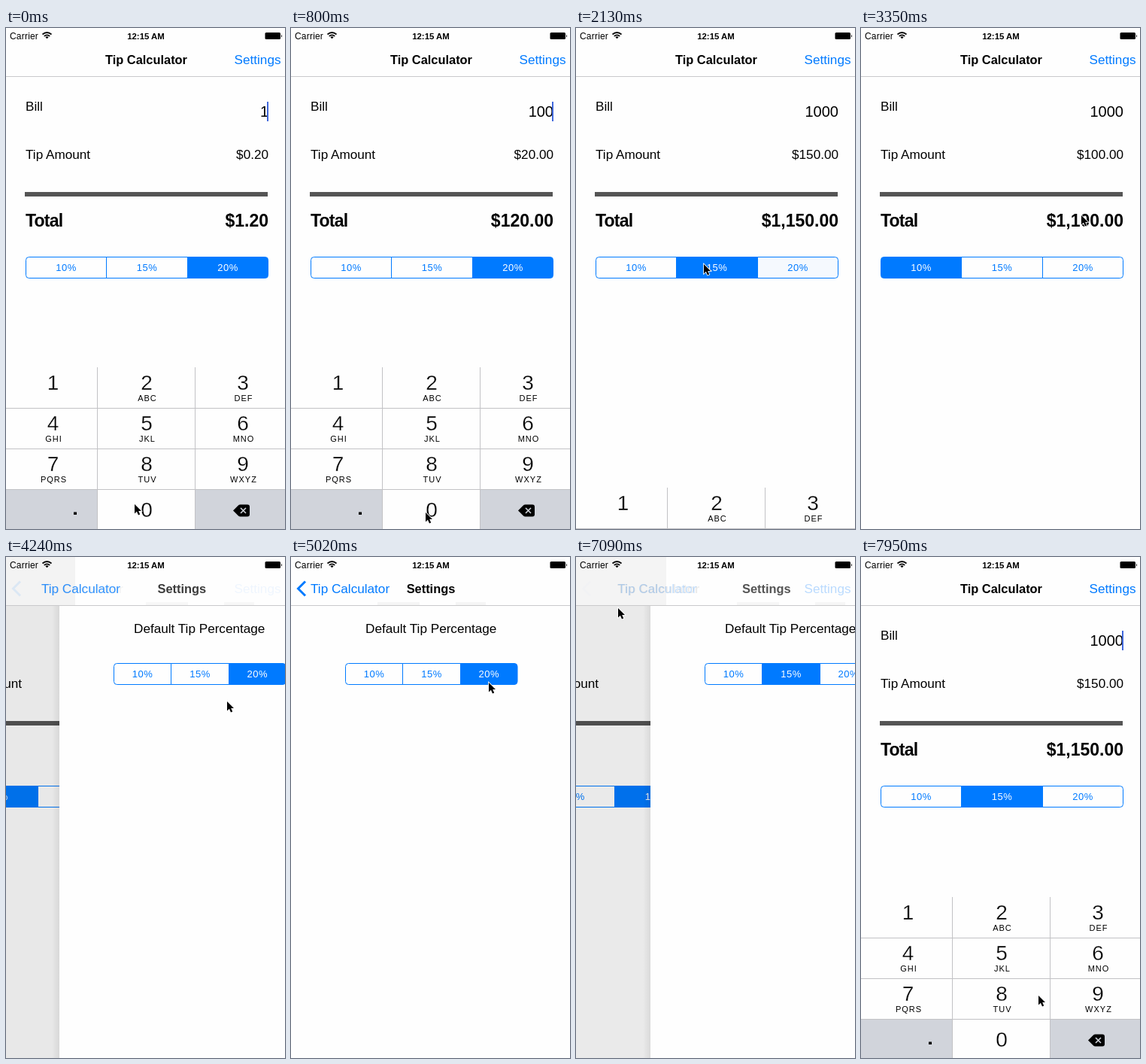
Animation of 371 by 666 pixels, one loop 8000 ms. Source, as an HTML page:

```html
<!DOCTYPE html>
<html lang="en">
<head>
<meta charset="utf-8">
<title>Tip Calculator</title>
<style>
  html, body { margin: 0; width: 100%; height: 100%; overflow: hidden; background: #fefefe; }
  svg { display: block; font-family: "Liberation Sans", Arial, sans-serif; font-size: 17.15px; }
  .bold { font-weight: bold; font-size: 16.4px; }
  .sum { font-weight: bold; font-size: 23px; }
  .blue { fill: #007aff; }
  .end { text-anchor: end; }
  .mid { text-anchor: middle; }
  .seg { font-size: 13px; letter-spacing: .5px; text-anchor: middle; }
  .digit { font-size: 28px; text-anchor: middle; stroke: #fefefe; stroke-width: .35px; }
  .abc { font-size: 11px; letter-spacing: 1px; text-anchor: middle; }
</style>
</head>
<body>
<svg id="stage" width="371" height="666" viewBox="0 0 371 666">
  <defs>
    <linearGradient id="edge"><stop offset="0" stop-opacity="0"/><stop offset="1" stop-opacity=".07"/></linearGradient>
  </defs>
  <rect width="371" height="666" fill="#fefefe"/>

  <g id="calc">
    <text x="26" y="110">Bill</text>
    <text id="bill" class="end" x="349" y="118" font-size="20"></text>
    <rect id="caret" x="347" y="98" width="2" height="26" fill="#4068dc"/>
    <text x="26" y="174">Tip Amount</text>
    <text id="tip" class="end" x="349" y="174"></text>
    <rect x="25" y="218" width="323" height="6" fill="#555"/>
    <text class="sum" x="26" y="264" letter-spacing="-.8">Total</text>
    <text id="total" class="sum end" x="349" y="264"></text>
    <g id="tipSeg"></g>
  </g>
  <rect id="dim" width="371" height="666"/>
  <g id="pad"></g>

  <g id="page">
    <rect x="-10" width="10" height="666" fill="url(#edge)"/>
    <rect width="371" height="666" fill="#fefefe"/>
    <text x="99" y="101">Default Tip Percentage</text>
    <g id="defSeg"></g>
  </g>

  <rect width="371" height="64" fill="#fefefe"/>
  <rect id="shade" height="64"/>
  <path id="smudge" d="M115 60h56v4h-56zM219 60h40v4h-40z" fill="#f5f5f5"/>
  <path d="M0 64.5H371" stroke="#c9c9cb"/>
  <text class="bold mid" id="title" x="186.5" y="48">Tip Calculator</text>
  <text class="blue end" id="link" x="365.5" y="48">Settings</text>
  <path id="arrow" d="M19 32.5L9.5 42L19 51.5" fill="none" stroke="#007aff" stroke-width="3"/>
  <text class="blue" id="back" x="26" y="48">Tip Calculator</text>
  <text class="bold mid" id="name" x="186" y="48">Settings</text>

  <text x="5" y="14.5" font-size="12" letter-spacing=".2">Carrier</text>
  <g fill="none" stroke="#000" stroke-width="1.7">
    <path d="M48.5 8.5Q54.5 3.5 60.5 8.5M50.7 10.9Q54.5 7.8 58.3 10.9"/>
    <path d="M52.3 12L54.5 14.3L56.7 12Q54.5 10.3 52.3 12Z" fill="#000" stroke="none"/>
  </g>
  <text class="mid" x="186" y="14.5" font-size="11.4" font-weight="bold">12:15 AM</text>
  <rect x="344.5" y="6" width="20.5" height="9" rx="1.5"/>
  <path d="M366 8.5q1.8 2 0 4z"/>

  <path id="mouse" d="M1 1V13.5L3.9 10.800L6 15.500L8.200 14.500L6.200 10H10Z" stroke="#fff" stroke-width="1.6" paint-order="stroke"/>
</svg>
<script>
const LOOP = 8000, W = 371;
const $ = id => document.getElementById(id);

// Runs of evenly spaced updates: first, last, count
const RUNS = [[0, 0, 1], [150, 800, 5], [1100, 2130, 8], [2270, 2600, 3], [2900, 3940, 8],
  [4090, 4240, 2], [4420, 5020, 4], [5170, 6210, 8], [6350, 6350, 1], [6650, 6650, 1], [6950, 7950, 7]];
const TICKS = RUNS.flatMap(([a, b, n]) =>
  Array.from({ length: n }, (_, i) => a + (n > 1 ? (b - a) * i / (n - 1) : 0)));

// Pointer path: time, x, y
const PATH = [[0, 170, 632], [320, 178, 643], [1250, 178, 643], [1840, 169, 313], [2200, 169, 313],
  [2600, 84, 322], [2900, 82, 323], [3050, 90, 320], [3350, 295, 247], [3600, 330, 42],
  [3970, 330, 42], [4240, 293, 191], [4420, 286, 190], [5020, 262, 166], [5620, 186, 163],
  [5910, 183, 162], [6060, 183, 162], [6210, 48, 45], [6350, 42, 35], [6900, 42, 35],
  [7600, 224, 480], [7950, 235, 582]];

const PUSH = 3997, POP = 6870, PAD_OUT = 1920, PAD_IN = 7360;

function add(parent, tag, attrs, text = "") {
  const el = document.createElementNS("http://www.w3.org/2000/svg", tag);
  for (const k in attrs) el.setAttribute(k, attrs[k]);
  el.textContent = text;
  parent.append(el);
  return el;
}

// Segmented control; returns a setter taking three fill levels
function segments(g, y, edges) {
  const [l, a, b, r] = edges, h = 28;
  const shapes = [
    `M${a} ${y}H${l + 4}q-4 0 -4 4v${h - 8}q0 4 4 4H${a}Z`,
    `M${a} ${y}H${b}v${h}H${a}Z`,
    `M${b} ${y}H${r - 4}q4 0 4 4v${h - 8}q0 4 -4 4H${b}Z`
  ];
  const cells = shapes.map((d, i) => [
    add(g, "path", { d, fill: "#007aff", stroke: "#007aff" }),
    add(g, "text", { class: "seg", x: (edges[i] + edges[i + 1]) / 2, y: y + 18.5 }, 10 + 5 * i + "%")
  ]);
  return levels => cells.forEach(([box, label], i) => {
    box.setAttribute("fill-opacity", levels[i]);
    label.setAttribute("fill", levels[i] > .5 ? "#fff" : "#007aff");
  });
}

function buildPad() {
  const g = $("pad"), cols = [0, 121.5, 251.5, W], mids = [62.5, 187, 315];
  const letters = ["", "ABC", "DEF", "GHI", "JKL", "MNO", "PQRS", "TUV", "WXYZ"];
  add(g, "rect", { y: 451, width: W, height: 215, fill: "#fefefe" });
  for (const c of [0, 2])
    add(g, "rect", { x: cols[c], y: 613, width: cols[c + 1] - cols[c], height: 53, fill: "#d1d4db" });
  const zero = add(g, "rect", { x: 122, y: 614, width: 129, height: 52 });
  add(g, "path", { d: "M0 505.5H371M0 559.5H371M0 613.5H371M121.5 451V666M251.5 451V666", stroke: "#c2c2c5" });
  letters.forEach((s, i) => {
    const x = mids[i % 3], y = 481 + 54 * Math.floor(i / 3);
    add(g, "text", { class: "digit", x, y }, i + 1);
    add(g, "text", { class: "abc", x: x + 1, y: y + 15 }, s);
  });
  add(g, "text", { class: "digit", x: 187, y: 650 }, "0");
  add(g, "rect", { x: 90, y: 643.5, width: 4, height: 3.5 });
  add(g, "path", { d: "M302 641.5L309 634.5Q310 633.5 311.5 633.5H321Q324 633.5 324 636.5V646.5Q324 649.5 321 649.5H311.5Q310 649.5 309 648.5Z" });
  add(g, "path", { d: "M312 638l7 7m0 -7l-7 7", stroke: "#d1d4db", "stroke-width": 1.6 });
  return zero;
}

const zeroKey = buildPad();
const setTip = segments($("tipSeg"), 304.5, [26.5, 133.5, 241.5, 348.5]);
const setDefault = segments($("defSeg"), 141.5, [72.5, 148.5, 225.5, 301]);

const clamp = v => Math.max(0, Math.min(1, v));
const spring = ms => {
  if (ms <= 0) return 0;
  const u = ms * .0126;
  return u > 9 ? 1 : 1 - (1 + u) * Math.exp(-u);
};
const within = (t, a, b) => t >= a && t < b;
const move = (id, x, y = 0) => $(id).setAttribute("transform", `translate(${x} ${y})`);
const fade = (id, v) => $(id).setAttribute("opacity", v);
const money = v => "$" + v.toLocaleString("en-US", { minimumFractionDigits: 2, maximumFractionDigits: 2 });

// Fill levels from a list of [time, index] choices; the old choice fades out
function levels(t, picks) {
  const out = [0, 0, 0];
  const k = picks.findLastIndex(p => p[0] <= t);
  if (k > 0) out[picks[k - 1][1]] = clamp(1 - (t - picks[k][0]) / 218);
  out[picks[k][1]] = 1;
  return out;
}

function pointer(t) {
  const i = PATH.findIndex(p => p[0] > t);
  if (i < 0) return PATH.at(-1).slice(1);
  const [a, b] = [PATH[i - 1], PATH[i]];
  const u = (t - a[0]) / (b[0] - a[0]);
  return [a[1] + (b[1] - a[1]) * u, a[2] + (b[2] - a[2]) * u];
}

function draw(t) {
  const bill = t < 300 ? 1 : t < 620 ? 10 : t < 1240 ? 100 : 1000;
  const rate = t < PAD_OUT ? 20 : t < 2850 ? 15 : t < POP ? 10 : 15;
  const tip = bill * rate / 100;
  $("bill").textContent = bill;
  $("tip").textContent = money(tip);
  $("total").textContent = money(bill + tip);
  fade("caret", t < PAD_OUT || t >= PAD_IN ? 1 : 0);
  setTip(t < POP ? levels(t, [[0, 2], [PAD_OUT, 1], [2850, 0]]) : [0, 1, 0]);
  setDefault(levels(t, [[0, 2], [5852, 1]]));

  const pressed = within(t, 150, 300) || within(t, 450, 620) || within(t, 1100, 1240);
  zeroKey.setAttribute("fill", pressed ? "#d1d4db" : "#fefefe");
  const down = t < PAD_IN ? spring(t - PAD_OUT) : 1 - spring(t - PAD_IN);
  move("pad", 0, Math.round(216 * down));

  const p = t < POP ? spring(t - PUSH) : 1 - spring(t - POP);
  const x = Math.round(W * (1 - p)), moving = p > 0 && p < 1;
  move("calc", Math.round(-112 * p));
  fade("dim", .105 * p);
  move("page", x);
  fade("page", p > 0 ? 1 : 0);
  $("shade").setAttribute("width", Math.min(W, x + 21));
  fade("shade", moving ? .055 * p : 0);
  move("smudge", x);
  fade("smudge", p);

  move("title", -105 * p);
  fade("title", (1 - p) ** 2);
  fade("link", (1 - p) * (within(t, 3780, 4700) ? .3 : 1));
  const held = within(t, 6600, POP + 500) ? .3 : 1;
  move("back", 110 * (1 - p));
  fade("back", p * held);
  fade("arrow", p ** 11 * held);
  move("name", 252 * (1 - p));
  fade("name", p ** 1.3);

  move("mouse", ...pointer(t).map(Math.round));
}

function frame(now) {
  const t = now % LOOP;
  draw(TICKS.findLast(s => s <= t + 10));
  requestAnimationFrame(frame);
}
draw(0);
requestAnimationFrame(frame);
</script>
</body>
</html>
```
